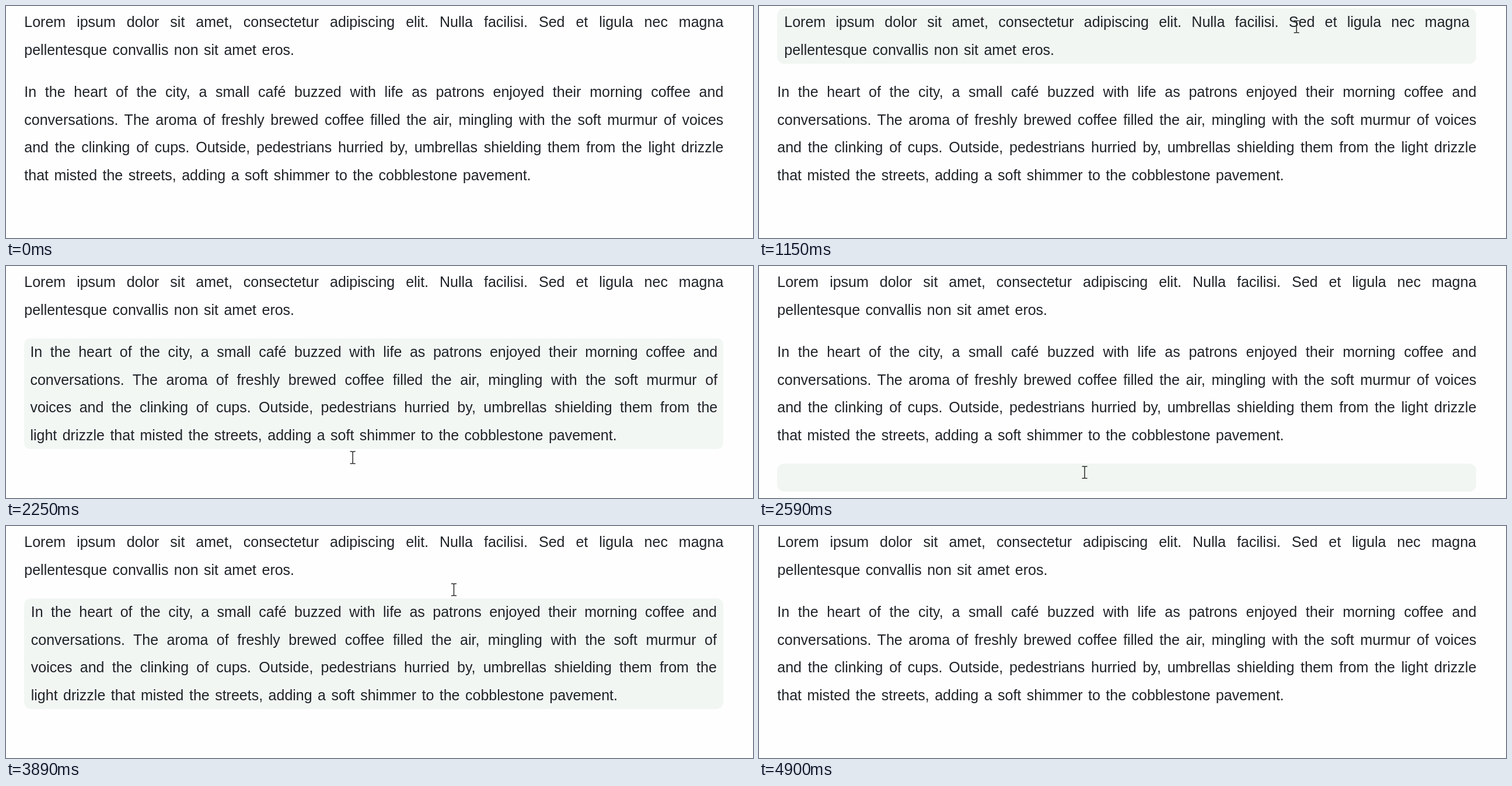
Write an HTML page that moves like this. It is 1280 px wide and 398 px high and loops after 5.69 s.

```html
<!DOCTYPE html>
<html lang="en">
<head>
<meta charset="utf-8">
<title>Paragraph hover</title>
<style>
  html, body { margin: 0; width: 100%; height: 100%; overflow: hidden; background: #fefefe; }
  #page { position: absolute; left: 31.3px; top: 4.2px; width: 1198px; }
  p {
    box-sizing: border-box;
    margin: 0;
    min-height: 1.9em;
    font: 25px/1.9 "Liberation Sans", Arial, sans-serif;
    word-spacing: 0.1em;
    text-align: justify;
    color: #1f2328;
  }
  p + p { margin-top: 1em; }
  svg { position: absolute; left: 0; top: 0; width: 100%; height: 100%; overflow: hidden; }
</style>
</head>
<body>
<div id="page">
  <p>Lorem ipsum dolor sit amet, consectetur adipiscing elit. Nulla facilisi. Sed et ligula nec magna pellentesque convallis non sit amet eros.</p>
  <p>In the heart of the city, a small café buzzed with life as patrons enjoyed their morning coffee and conversations. The aroma of freshly brewed coffee filled the air, mingling with the soft murmur of voices and the clinking of cups. Outside, pedestrians hurried by, umbrellas shielding them from the light drizzle that misted the streets, adding a soft shimmer to the cobblestone pavement.</p>
  <p></p>
</div>
<svg>
  <path id="cursor" fill="none" stroke="#2b2b2b" stroke-width="1.5"
    d="M-4.5-10.3H-1.5Q0-10.3 0-9Q0-10.3 1.5-10.3H4.5M0-9V9M-4.5 10.3H-1.5Q0 10.3 0 9Q0 10.3 1.5 10.3H4.5"/>
</svg>
<script>
const LOOP = 5690, STEP = 68.44, FIRST_STEP = 530;
const FADE = 300, INSET = 12;
const PLAIN = [254, 254, 254], HOVER = [241, 246, 242];

const outside = { x: 1290, y: 104 };
const moves = [
  { from: 485, until: 800, x: 980, y: 14 },
  { from: 800, until: 1010, x: 935, y: 20 },
  { from: 1095, until: 1385, x: 765, y: 209 },
  { from: 1830, until: 2390, x: 558, y: 354 },
  { from: 3030, until: 3550, x: 680, y: 200 },
  { from: 3680, until: 4060, x: 838, y: 36 },
  { from: 4360, until: 4575, x: 846, y: 31 },
  { from: 4575, until: 4630, x: 846, y: -20 }
];

const cursor = document.getElementById("cursor");
const clamp = v => Math.min(1, Math.max(0, v));
const mix = (a, b, k) => a + (b - a) * k;
const smooth = k => k * k * (3 - 2 * k);
const bezier = (a, b, s) => 3 * a * s * (1 - s) ** 2 + 3 * b * s * s * (1 - s) + s ** 3;

// The CSS "ease" curve
function ease(x) {
  if (x <= 0 || x >= 1) return clamp(x);
  let low = 0, high = 1;
  for (let i = 0; i < 20; i++) {
    const mid = (low + high) / 2;
    if (bezier(0.25, 0.25, mid) < x) low = mid; else high = mid;
  }
  return bezier(0.1, 1, low);
}

function pointerAt(t) {
  let { x, y } = outside;
  for (const move of moves) {
    const k = smooth(clamp((t - move.from) / (move.until - move.from)));
    x = mix(x, move.x, k);
    y = mix(y, move.y, k);
  }
  return { x, y };
}

// Follow the pointer through one loop and note when it enters and leaves the box
function findHovers(box) {
  const hovers = [];
  let inside = false;
  for (let t = 0; t < LOOP; t += 5) {
    const { x, y } = pointerAt(t);
    const now = x > box.left && x < box.right && y > box.top && y < box.bottom;
    if (now && !inside) hovers.push({ enter: t, leave: LOOP });
    if (!now && inside) hovers[hovers.length - 1].leave = t;
    inside = now;
  }
  return hovers;
}

const paragraphs = [...document.querySelectorAll("p")].map(el => ({
  el, hovers: findHovers(el.getBoundingClientRect())
}));

function hoverAmount(hovers, t) {
  const last = hovers.filter(h => t >= h.enter).pop();
  if (!last) return 0;
  return t < last.leave ? ease((t - last.enter) / FADE) : 1 - ease((t - last.leave) / FADE);
}

function drawParagraph({ el, hovers }, t) {
  const k = hoverAmount(hovers, t);
  el.style.padding = `0 ${INSET * k}px`;
  el.style.borderRadius = `${INSET * k}px`;
  el.style.background = `rgb(${PLAIN.map((c, i) => Math.round(mix(c, HOVER[i], k)))})`;
}

function render(time) {
  const t = FIRST_STEP + STEP * Math.floor((time - FIRST_STEP) / STEP);
  const { x, y } = pointerAt(t);
  paragraphs.forEach(p => drawParagraph(p, t));
  cursor.setAttribute("transform", `translate(${x} ${y})`);
}

const start = performance.now();
function tick() {
  render((performance.now() - start) % LOOP);
  requestAnimationFrame(tick);
}
tick();
</script>
</body>
</html>
```
